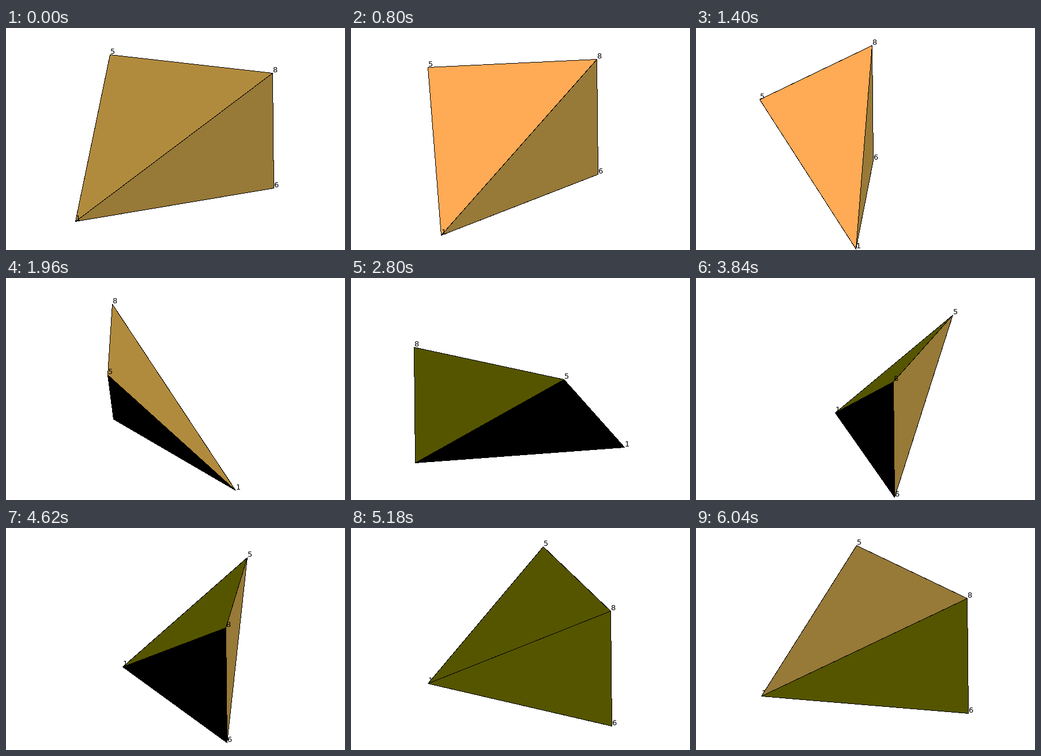
An HTML page that plays this animation: 588 by 386 pixels, repeating every 7.05 s.

```html
<!DOCTYPE html>
<html lang="en">
<head>
<meta charset="utf-8">
<title>Turning tetrahedron</title>
<style>
  html, body { margin: 0; width: 100%; height: 100%; overflow: hidden; background: #fff; }
  svg { display: block; width: 588px; height: 386px; }
  polygon { stroke: #000; stroke-width: 1; stroke-linejoin: round; shape-rendering: crispEdges; }
  text { font: 13px "DejaVu Sans", sans-serif; fill: #000; }
</style>
</head>
<body>
<svg viewBox="0 0 588 386"><g id="under"></g><g id="faces"></g><g id="over"></g></svg>
<script>
const LOOP = 7050, STEP = 40;
const TILT = 0.432, ROLL = 0.01, SCALE = 73.5, CX = 291.75, CY = 207.5;
const RAD = Math.PI / 180;

// Corners of a 4 x 3 x 3 box, kept under their labels
const corners = {
  1: [-2.5, 0, -1.5],
  5: [-0.7, 2.4, 1.5],
  6: [2.5, 0, -1.5],
  8: [2.5, 0, 1.5]
};
const faceIds = [[5, 8, 1], [8, 6, 1], [5, 6, 8], [5, 6, 1]];

// Turn of the solid: [ms, degrees]
const turn = [
  [400, 20.5], [1120, 64], [1400, 85], [1840, 115.1], [1960, 125], [2560, 171.3],
  [2800, 188.8], [3280, 218.2], [3840, 286.1], [4340, 286.1], [5060, 324.7],
  [5180, 329.9], [5790, 349.6], [5870, 351.5], [6040, 347.4]
];
const stepStarts = [400, 4340, 5790, 6040];

// Lower bound of light for each shade
const shades = [[0.9, "#ffaa55"], [0.72, "#b18b3d"], [0.46, "#977938"], [0.05, "#555500"], [-2, "#000"]];

const dot = (a, b) => a[0] * b[0] + a[1] * b[1] + a[2] * b[2];
const sub = (a, b) => a.map((v, i) => v - b[i]);
const cross = (a, b) => [
  a[1] * b[2] - a[2] * b[1], a[2] * b[0] - a[0] * b[2], a[0] * b[1] - a[1] * b[0]
];
const ray = (az, el) => [
  Math.cos(az) * Math.cos(el), Math.sin(az) * Math.cos(el), Math.sin(el)
];
const light = ray(310 * RAD, 45 * RAD);
const eye = ray(-90 * RAD, TILT);

// Monotone cubic through the turn table
const rate = turn.slice(1).map((k, i) => (k[1] - turn[i][1]) / (k[0] - turn[i][0]));
const slope = turn.map((k, i) => {
  const a = rate[i - 1], b = rate[i];
  const still = v => v === undefined || v === 0;
  if (still(a) && still(b)) return 0;
  if (still(a)) return 0.6 * b;
  if (still(b)) return 0.6 * a;
  return a * b > 0 ? 2 * a * b / (a + b) : 0;
});

function angleAt(ms) {
  const last = turn.length - 1;
  if (ms <= turn[0][0]) return turn[0][1];
  if (ms >= turn[last][0]) return turn[last][1];
  const i = turn.findIndex(k => k[0] > ms) - 1;
  const [t0, a0] = turn[i], [t1, a1] = turn[i + 1];
  if (a0 === a1) return a0;
  const h = t1 - t0, u = (ms - t0) / h, w = 1 - u;
  return a0 * w * w * (1 + 2 * u) + a1 * u * u * (3 - 2 * u)
    + h * u * w * (slope[i] * w - slope[i + 1] * u);
}

function snap(ms) {
  const start = stepStarts.filter(s => s <= ms).pop();
  return start === undefined ? 0 : start + Math.floor((ms - start) / STEP) * STEP;
}

function spin([x, y, z], a) {
  const c = Math.cos(a), s = Math.sin(a);
  return [x * c - y * s, x * s + y * c, z];
}

function project(p) {
  const x = p[0] * SCALE;
  const y = -(p[1] * Math.sin(TILT) + p[2] * Math.cos(TILT)) * SCALE;
  return {
    x: Math.round(CX + x + ROLL * y - 0.5) + 0.5,
    y: Math.round(CY + y - ROLL * x - 0.5) + 0.5,
    z: dot(p, eye)
  };
}

// Depth of a flat face at a screen point, or null outside it
function depthAt([a, b, c], x, y) {
  const d = (b.x - a.x) * (c.y - a.y) - (c.x - a.x) * (b.y - a.y);
  if (!d) return null;
  const v = ((x - a.x) * (c.y - a.y) - (c.x - a.x) * (y - a.y)) / d;
  const w = ((b.x - a.x) * (y - a.y) - (x - a.x) * (b.y - a.y)) / d;
  return v < 0 || w < 0 || v + w > 1 ? null : a.z + v * (b.z - a.z) + w * (c.z - a.z);
}

const byId = id => document.getElementById(id);
const under = byId("under"), over = byId("over");
function make(tag, parent) {
  return parent.appendChild(document.createElementNS("http://www.w3.org/2000/svg", tag));
}

const faces = faceIds.map(ids => {
  const [a, b, c] = ids.map(id => corners[id]);
  const other = Object.keys(corners).find(id => !ids.includes(+id));
  let n = cross(sub(b, a), sub(c, a));
  const len = Math.hypot(...n) * Math.sign(dot(n, sub(a, corners[other])));
  n = n.map(v => v / len);
  return { ids, n, el: make("polygon", byId("faces")) };
});

const labels = Object.keys(corners).map(id => {
  const el = make("text", over);
  el.textContent = id;
  return { id, el };
});

// True when a face lies in front of part of the label at p
function hidden(p, shown) {
  return [3, 5.5, 8].some(dx => [-9, -6, -3].some(dy => shown.some(tri => {
    const z = depthAt(tri, p.x + dx, p.y + dy);
    return z !== null && z > p.z + 0.001;
  })));
}

function draw(ms) {
  const a = angleAt(snap(ms)) * RAD;
  const pts = {}, shown = [];
  for (const id in corners) pts[id] = project(spin(corners[id], a));
  for (const f of faces) {
    const n = spin(f.n, a), front = dot(n, eye) > 0;
    f.el.style.display = front ? "" : "none";
    if (!front) continue;
    const tri = f.ids.map(id => pts[id]);
    shown.push(tri);
    f.el.setAttribute("points", tri.map(p => p.x + "," + p.y).join(" "));
    f.el.setAttribute("fill", shades.find(s => dot(n, light) >= s[0])[1]);
  }
  for (const { id, el } of labels) {
    const p = pts[id], layer = hidden(p, shown) ? under : over;
    if (el.parentNode !== layer) layer.appendChild(el);
    el.setAttribute("x", p.x + 0.5);
    el.setAttribute("y", p.y - 1.5);
  }
}

const begin = performance.now();
function frame() {
  draw((performance.now() - begin) % LOOP);
  requestAnimationFrame(frame);
}
frame();
</script>
</body>
</html>
```
